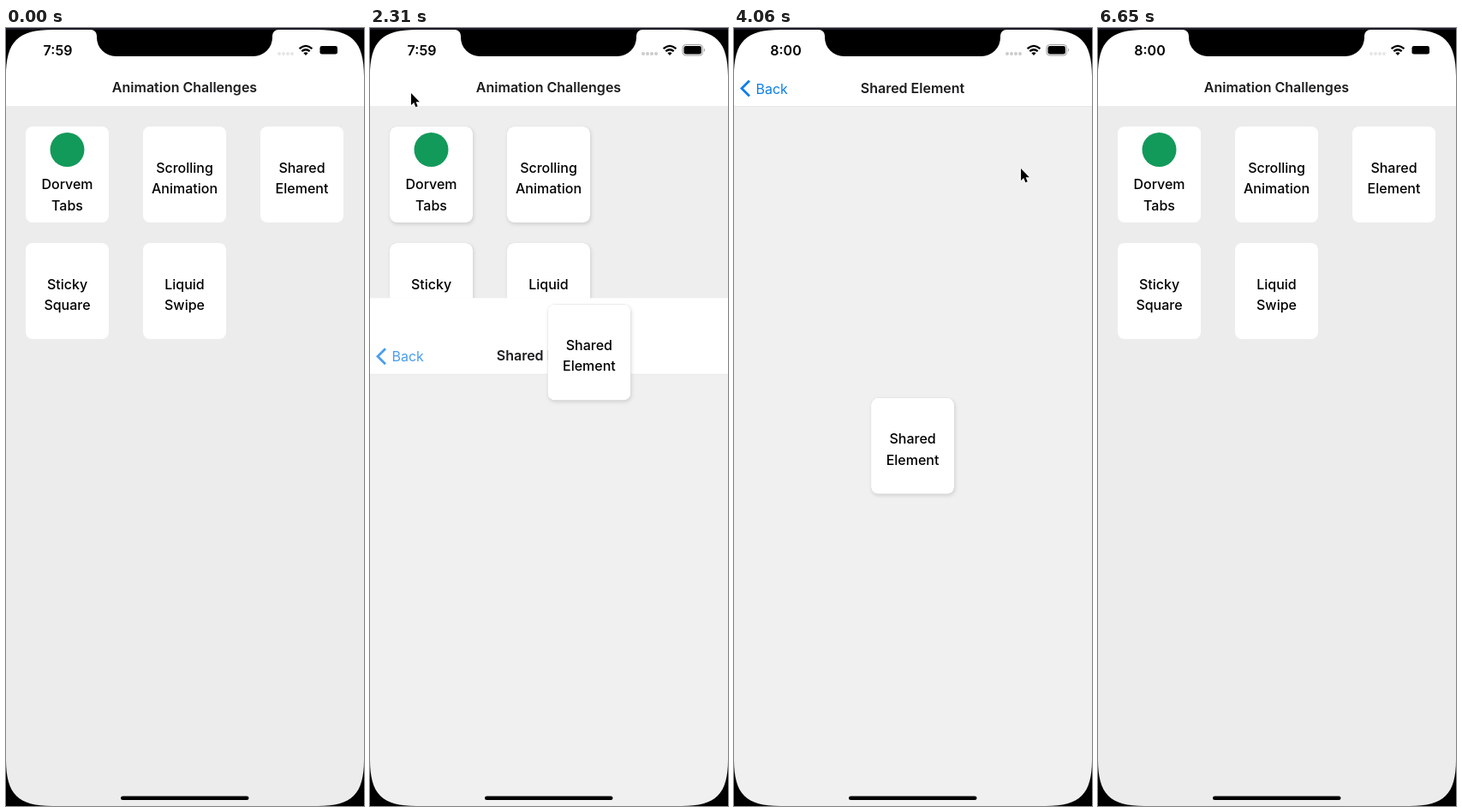
An HTML page for the animation above (6790 ms loop, 418x908 px).

```html
<!DOCTYPE html>
<html lang="en">
<head>
<meta charset="utf-8">
<title>Shared element transition</title>
<style>
  html, body { margin: 0; width: 100%; height: 100%; overflow: hidden; background: #000; }
  svg { display: block; width: 418px; height: 908px; }
  text { font: 500 16px Inter, "Liberation Sans", sans-serif; text-anchor: middle; fill: #000; }
  .title { font-weight: 600; fill: #1c1c1e; }
  .clock { font-weight: 600; }
  #back text { font-weight: 400; text-anchor: start; fill: #0f7fe8; }
  .shadows .card rect {
    filter: drop-shadow(0 0 .7px rgba(0,0,0,.25)) drop-shadow(1px 2px 2px rgba(0,0,0,.13));
  }
</style>
</head>
<body>
<svg id="stage" viewBox="0 0 418 908">
  <g id="home">
    <rect id="homeBg" width="418" height="908" fill="#ececec"/>
    <rect width="418" height="91" fill="#fff"/>
    <text class="title" x="208.5" y="75">Animation Challenges</text>
    <g id="cards"></g>
  </g>

  <g id="modal">
    <rect y="2" width="418" height="908" fill="#f0f0f0"/>
    <rect y="2" width="418" height="89" fill="#fff"/>
    <rect y="90.5" width="418" height=".7" fill="#e2e2e2"/>
    <g id="back">
      <path d="M18 61L9 70L18 79" fill="none" stroke="#0f7fe8" stroke-width="2.8"/>
      <text x="25.5" y="76">Back</text>
    </g>
    <text class="title" x="208.5" y="75">Shared Element</text>
  </g>

  <g id="shared"></g>

  <g id="status">
    <text id="clock" class="clock" x="60.5" y="31.5">7:59</text>
    <path id="dots" d="M319 30H335" stroke-width="4" stroke-linecap="round" stroke-dasharray="0 5"/>
    <g fill="none" stroke="#000" stroke-width="2.3">
      <path d="M342.6 24.2Q350 17.6 357.4 24.2"/>
      <path d="M345.3 27.2Q350 23.2 354.7 27.2"/>
    </g>
    <path d="M347.4 29.2Q350 27.2 352.6 29.2L350 32Z"/>
    <g id="outline">
      <rect x="365" y="19.5" width="23.5" height="12.5" rx="3.6" fill="#fff" stroke="#999"/>
      <path d="M390 23.6Q392 25.7 390 27.9Z" fill="#999"/>
    </g>
    <rect x="366.5" y="21" width="20.5" height="9.6" rx="2.4"/>
  </g>

  <path fill-rule="evenodd" d="M0 0H418V908H0Z
    M54 2H364C404 2 418 16 418 56V854C418 894 404 908 364 908H54C14 908 0 894 0 854V56C0 16 14 2 54 2Z"/>
  <path d="M99 0V2A7 7 0 0 1 106 9V11A22 22 0 0 0 128 33H289A22 22 0 0 0 311 11V9A7 7 0 0 1 318 2V0Z"/>
  <rect width="418" height="2" fill="#1b1b26"/>
  <rect x="134" y="896.4" width="149.5" height="4.7" rx="2.3"/>
  <path id="cursor" d="M0 0V14L3.2 11L5.4 16.2L7.7 15.2L5.6 10.2H9.9Z"
    stroke="#fff" stroke-width="1" paint-order="stroke"/>
</svg>

<script>
const LOOP = 6790, STEP = 70, TRAVEL = 906;
const $ = id => document.getElementById(id);
const place = (el, x, y) => el.setAttribute('transform', `translate(${x} ${y})`);
const within = (t, a, b) => t >= a && t < b;

const card = (label, i, icon) => {
  const x = 23 + 137 * (i % 3), y = 115 + 136 * Math.floor(i / 3);
  const words = label.split(' ').map((word, row) =>
    `<text x="48.5" y="${(icon ? 73 : 53.5) + row * 24.5}">${word}</text>`).join('');
  const dot = icon ? `<circle cx="48.5" cy="27" r="20" fill="${icon}"/>` : '';
  return `<g class="card" transform="translate(${x} ${y})">
    <rect width="97" height="112" rx="8" fill="#fff"/>${dot}${words}</g>`;
};

// the empty slot is where the shared card rests
const labels = ['Dorvem Tabs', 'Scrolling Animation', '', 'Sticky Square', 'Liquid Swipe'];
$('cards').innerHTML = labels.map((s, i) => s && card(s, i, i ? '' : '#129a5a')).join('');
$('shared').innerHTML = card('Shared Element', 2);

const opens = [877, 3520], closes = [2243, 4870];

// critically damped spring, stiffness 1000 and mass 3
const spring = ms => {
  const x = Math.sqrt(1000 / 3) * Math.max(0, ms) / 1000;
  return 1 - Math.exp(-x) * (1 + x);
};
const sum = (list, fn) => list.reduce((total, v) => total + fn(v), 0);
const openness = t => sum(opens, s => spring(t - s)) - sum(closes, s => spring(t - s));
const backFade = t => 1 - .55 * sum(closes, s => Math.exp(-(((t - s + 50) / 130) ** 2)));

// each glide eases out from the previous resting point
const glides = [
  { at: 70, x: 345, y: 184, ms: 140 },
  { at: 1330, x: 48, y: 76 },
  { at: 2450, x: 300, y: 138 },
  { at: 3010, x: 335, y: 164 },
  { at: 4130, x: 59, y: 81 },
  { at: 5250, x: 270, y: 930 }
];

function pointer(t) {
  let x = 290, y = 718;
  for (const g of glides) {
    const left = 1 - Math.min(1, Math.max(0, (t - g.at) / (g.ms || 420)));
    const k = 1 - left ** 3;
    x += (g.x - x) * k;
    y += (g.y - y) * k;
  }
  return [x, y];
}

function draw(t) {
  const p = openness(t);
  place($('modal'), 0, TRAVEL * (1 - p));
  place($('shared'), -137 * p, 317 * p);
  $('back').setAttribute('opacity', backFade(t));

  const rich = within(t, 770, 2450) || within(t, 3430, 6650);
  $('stage').classList.toggle('shadows', rich && t >= 980);
  $('homeBg').setAttribute('fill', rich ? '#eee' : '#ececec');
  $('dots').setAttribute('stroke', rich ? '#ccc' : '#e6e6e6');
  $('outline').setAttribute('opacity', rich ? 1 : 0);
  $('clock').textContent = t < 4000 ? '7:59' : '8:00';

  $('cursor').style.display = within(t, 70, 5530) ? '' : 'none';
  place($('cursor'), ...pointer(t));
}

const start = performance.now();
function tick() {
  const t = (performance.now() - start) % LOOP;
  draw(Math.floor(t / STEP) * STEP);
  requestAnimationFrame(tick);
}
tick();
</script>
</body>
</html>
```
